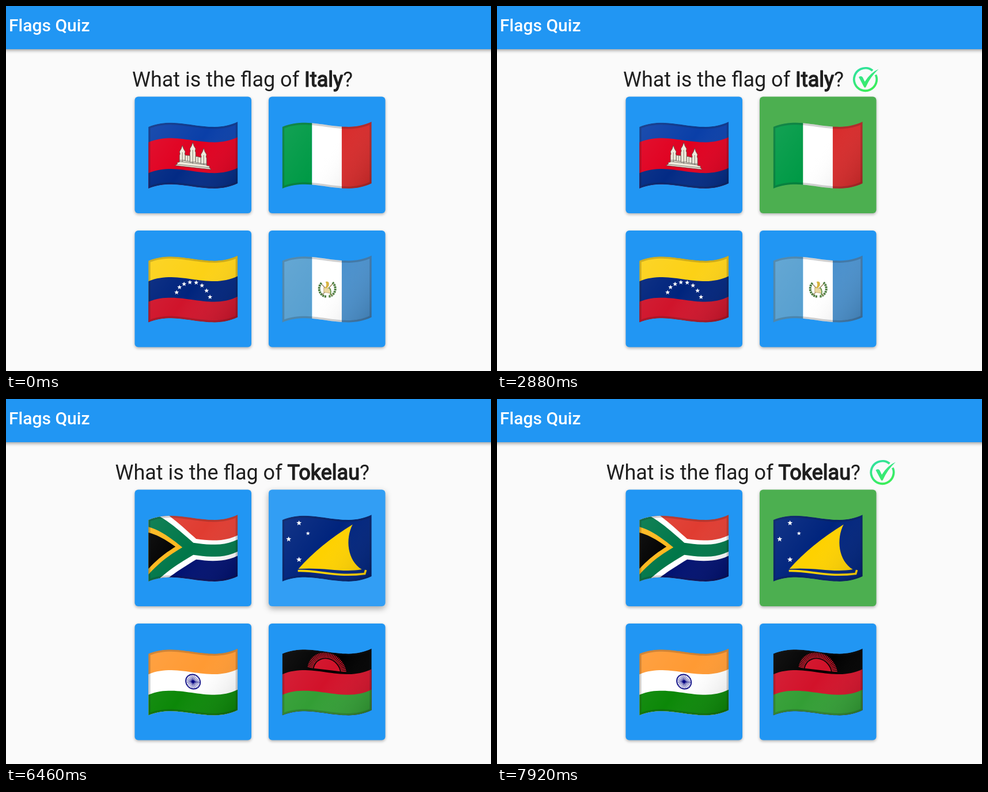
These frames come from a looping animation (842 px wide and 634 px high, 8 s). An HTML page with a canvas:

```html
<!DOCTYPE html>
<html lang="en">
<head>
<meta charset="utf-8">
<title>Flags Quiz</title>
<style>
  html, body { margin: 0; width: 100%; height: 100%; overflow: hidden; background: #fafafa; }
  canvas { display: block; }
</style>
</head>
<body>
<canvas id="stage" width="842" height="634"></canvas>
<script>
const c = document.getElementById('stage').getContext('2d');
const LOOP = 8000, W = 155, H = 107, CARD = 202.5;
const BLUE = [33, 150, 243], GREEN = [76, 175, 80];
const PRESSES = [1500, 6750], NEXT = 4880;

const ramp = (t, from, to) => Math.max(0, Math.min(1, (t - from) / (to - from)));
const mix = (a, b, k) => `rgb(${a.map((v, i) => v + (b[i] - v) * k)})`;

// Height of the cloth's wave at x
function wave(x) {
  const u = x / W, v = 1 - u;
  return 9 * v ** 3 - 39 * u * v * v + 75 * u * u * v;
}

function band(y0, y1) {
  c.beginPath();
  for (let x = 0; x <= W; x += 5) c.lineTo(x, y0 + wave(x));
  for (let x = W; x >= 0; x -= 5) c.lineTo(x, y1 + wave(x));
  c.closePath();
}

function stripes(colors, sizes = [1, 1, 1]) {
  const total = sizes.reduce((a, b) => a + b);
  let y = 0;
  colors.forEach((color, i) => {
    band(y * H / total, H);
    c.fillStyle = color;
    c.fill();
    y += sizes[i];
  });
}

function pales(colors) {
  colors.forEach((color, i) => {
    c.fillStyle = color;
    c.fillRect(i * 51.6, -2, 51.7, 124);
  });
}

// Polygon on the flat cloth, bent along the wave
function cloth(color, pts) {
  c.beginPath();
  pts.forEach(([x, y], i) => {
    const [nx, ny] = pts[(i + 1) % pts.length];
    for (let k = 0; k < 10; k++) {
      const px = x + (nx - x) * k / 10;
      c.lineTo(px, y + (ny - y) * k / 10 + wave(px));
    }
  });
  c.fillStyle = color;
  c.fill();
}

function shape(d, fill, stroke, width = 1) {
  const p = new Path2D(d);
  if (fill) { c.fillStyle = fill; c.fill(p); }
  if (stroke) { c.strokeStyle = stroke; c.lineWidth = width; c.stroke(p); }
}

function star(x, y, r) {
  c.beginPath();
  for (let i = 0; i < 10; i++) {
    const a = i * Math.PI / 5 - Math.PI / 2, q = i % 2 ? r * 0.42 : r;
    c.lineTo(x + q * Math.cos(a), y + q * Math.sin(a));
  }
  c.fillStyle = '#fff';
  c.fill();
}

function disc(r, color) {
  c.beginPath();
  c.arc(0, 0, r, 0, 7);
  c.fillStyle = color;
  c.fill();
}

function arc(r, from, to, color, width) {
  c.beginPath();
  c.arc(0, 0, r, from, to);
  c.strokeStyle = color;
  c.lineWidth = width;
  c.stroke();
}

function rays(n, from, to, r0, r1, color, width) {
  c.beginPath();
  for (let i = 0; i < n; i++) {
    const a = from + (to - from) * i / (n - 1);
    c.moveTo(r0 * Math.cos(a), r0 * Math.sin(a));
    c.lineTo(r1 * Math.cos(a), r1 * Math.sin(a));
  }
  c.strokeStyle = color;
  c.lineWidth = width;
  c.stroke();
}

function cambodia() {
  stripes(['#0a3fa8', '#e00020', '#032b85'], [1, 2, 1]);
  const cream = '#f0ebdc', line = '#4a4640';
  shape('M46 76 L50 74 50 71 54 70 54 66 101 72 101 76 106 77 106 80 109 83Z', cream, line, 0.7);
  for (const [x, top, base] of [[59, 41, 67], [77, 36, 70], [96, 46, 73]])
    shape(`M${x} ${top} l2 6 3 5 -1 4 1 2 0 ${base - top - 17} -10 0 0 ${top + 17 - base} 1 -2 -1 -4 3 -5Z`, cream, line, 0.7);
  shape('M64 58 L72 59 72 69 64 68Z M82 60 L91 62 91 72 82 71Z', cream, line, 0.7);
  shape('M59 53 V70 M77 49 V73 M96 58 V75 M68 59 V68 M86 62 V71 M54 69 L101 75 M50 74 L106 80', null, line, 0.7);
}

function italy() {
  pales(['#009a46', '#fff', '#d82b2b']);
}

function venezuela() {
  stripes(['#fcd116', '#00247d', '#d0142b']);
  [[49, 64], [54, 55], [62, 49.5], [72, 46.5], [83, 47], [93, 52], [101, 61], [107, 72]]
    .forEach(([x, y]) => star(x, y, 4.3));
}

function guatemala() {
  pales(['#58a0d0', '#fff', '#4a90cc']);
  c.save();
  c.translate(78, 57.5);
  c.setLineDash([3, 1]);
  arc(14, 1.7, 4, '#4b7b3c', 4);
  arc(14, -0.86, 1.45, '#4b7b3c', 4);
  c.setLineDash([]);
  shape('M-9 11 L9 -8 M9 12 L-9 -7', null, '#a08a65', 1.6);
  shape('M-6 -2 L6 0 6 8 -6 6Z', '#ead8a0', '#b09a60', 0.7);
  shape('M-3 -12 Q4 -14 3 -6 Q1 0 -5 -1 Q1 -5 -3 -12Z', '#d8b440');
  shape('M3 -2 Q9 4 4 13', null, '#5a9144', 1.5);
  c.restore();
}

function southAfrica() {
  stripes(['#e03c31', '#001070'], [1, 1]);
  const arms = (a, x, y) => [[0, 0], [a, 0], [x, y], [W, y], [W, H - y], [x, H - y], [a, H], [0, H]];
  cloth('#fff', arms(36, 83, 35.7));
  cloth('#007749', arms(20, 78, 43));
  cloth('#ffb81c', [[0, 12], [59, 53.5], [0, 95]]);
  cloth('#000', [[0, 22], [47, 53.5], [0, 85]]);
}

function tokelau() {
  stripes(['#00247d'], [1]);
  [[29, 14.5, 4.8], [11, 42.5, 4.8], [44.5, 32.5, 3.8], [29, 78, 5]].forEach(s => star(...s));
  shape('M28 94 Q65 52 122 17 C109 42 113 80 138 95 C104 101 74 91 28 94Z', '#fed100');
  shape('M27 97.5 C62 96 90 109 143 102.5 L145 96', null, '#fed100', 3.6);
}

function india() {
  stripes(['#ff9a33', '#fff', '#0c8808']);
  c.save();
  c.translate(77.5, 57.5);
  c.transform(1, 0.1, 0, 1, 0, 0);
  arc(12.6, 0, 7, '#000080', 1.7);
  rays(25, 0, Math.PI * 2, 0, 12, '#000080', 0.7);
  disc(2.6, '#000080');
  c.restore();
}

function malawi() {
  stripes(['#000', '#d2122a', '#339e35']);
  c.save();
  c.translate(77.5, 41);
  c.transform(1, 0.12, 0, 1, 0, 0);
  c.beginPath();
  c.rect(-40, -40, 80, 36);
  c.clip();
  disc(23, '#d2122a');
  rays(37, Math.PI, Math.PI * 2, 24.5, 34, '#c81428', 1.6);
  c.restore();
}

const ROUNDS = [
  { name: 'Italy', x: 219, tickX: 639.5, flags: [cambodia, italy, venezuela, guatemala] },
  { name: 'Tokelau', x: 189.5, tickX: 669, flags: [southAfrica, tokelau, india, malawi] }
];

function flag(draw, x, y) {
  c.save();
  c.translate(x, y);
  band(0, H);
  c.clip();
  draw();
  const shade = c.createLinearGradient(0, 0, W, H);
  shade.addColorStop(0, 'rgba(255,255,255,.08)');
  shade.addColorStop(0.5, 'rgba(255,255,255,0)');
  shade.addColorStop(1, 'rgba(0,0,0,.14)');
  c.fillStyle = shade;
  c.fillRect(0, -5, W, 130);
  band(0, H);
  c.strokeStyle = 'rgba(26,26,26,.2)';
  c.lineWidth = 7;
  c.stroke();
  c.restore();
}

function card(x, y, color, lift) {
  c.save();
  c.shadowColor = `rgba(0,0,0,${0.3 + lift * 0.04})`;
  c.shadowBlur = 5 + lift * 6;
  c.shadowOffsetY = 2 + lift * 2;
  c.beginPath();
  c.roundRect(x, y, CARD, CARD, 6);
  c.fillStyle = color;
  c.fill();
  c.restore();
}

// Hover, press and splash overlays of the right answer's card
function answerCard(x, y, t) {
  const green = ramp(t, 1500, 1650) - ramp(t, NEXT, NEXT + 200) + ramp(t, 6750, 6900);
  const hover = ramp(t, 460, 660) - ramp(t, 2790, 2880) + ramp(t, 6250, 6450) - ramp(t, 7790, 7900);
  const press = PRESSES.reduce((sum, s) => sum + ramp(t, s, s + 100) - ramp(t, s + 500, s + 750), 0);
  card(x, y, mix(BLUE, GREEN, green), hover + press * 0.4);
  c.save();
  c.beginPath();
  c.roundRect(x, y, CARD, CARD, 6);
  c.clip();
  c.fillStyle = `rgba(255,255,255,${hover * 0.08 + press * 0.16})`;
  c.fillRect(x, y, CARD, CARD);
  c.translate(588, 314);
  for (const s of PRESSES) {
    const age = t - s;
    if (age >= 0 && age < 360) disc(age * 0.48, `rgba(255,255,255,${0.07 * (1 - ramp(age, 190, 360))})`);
  }
  c.restore();
}

function tick(x) {
  c.save();
  c.translate(x, 127.5);
  const tint = c.createLinearGradient(-12, -20, 8, 20);
  tint.addColorStop(0, '#30e2a0');
  tint.addColorStop(1, '#3cee58');
  arc(19.7, -0.42, Math.PI * 2 - 0.88, tint, 3.8);
  shape('M-11.5 -4 Q-7 -7 -4.5 -3.5 L-1 4 Q9 -12 23 -18 Q9 -5 1 13 Q-1 16 -3 12Z', tint);
  c.restore();
}

function question({ name, x }) {
  const lead = 'What is the flag of ';
  c.font = '36px Roboto, sans-serif';
  c.fillStyle = c.strokeStyle = '#1f1f1f';
  c.fillText(lead, x, 140);
  x += c.measureText(lead).width;
  c.fillText(name, x, 140);
  c.lineWidth = 1.5;
  c.lineJoin = 'round';
  c.strokeText(name, x, 140);
  c.fillText('?', x + c.measureText(name).width, 140);
  c.lineJoin = 'miter';
}

function header() {
  c.save();
  c.shadowColor = 'rgba(0,0,0,.4)';
  c.shadowBlur = 6;
  c.shadowOffsetY = 2;
  c.fillStyle = `rgb(${BLUE})`;
  c.fillRect(-10, -10, 862, 85);
  c.restore();
  c.font = '500 30px Roboto, sans-serif';
  c.fillStyle = '#fff';
  c.fillText('Flags Quiz', 5, 44);
}

function frame(now) {
  const t = now % LOOP;
  const round = ROUNDS[t < NEXT ? 0 : 1];
  c.fillStyle = '#fafafa';
  c.fillRect(0, 0, 842, 634);
  header();
  question(round);
  round.flags.forEach((draw, i) => {
    const x = 223.5 + (i % 2) * 232.5, y = 157.5 + (i >> 1) * 232.5;
    if (i === 1) answerCard(x, y, t);
    else card(x, y, `rgb(${BLUE})`, 0);
    flag(draw, x + 23.7, y + 43.5);
  });
  if (t >= PRESSES[0] && t < NEXT || t >= PRESSES[1]) tick(round.tickX);
  requestAnimationFrame(frame);
}
requestAnimationFrame(frame);
</script>
</body>
</html>
```
